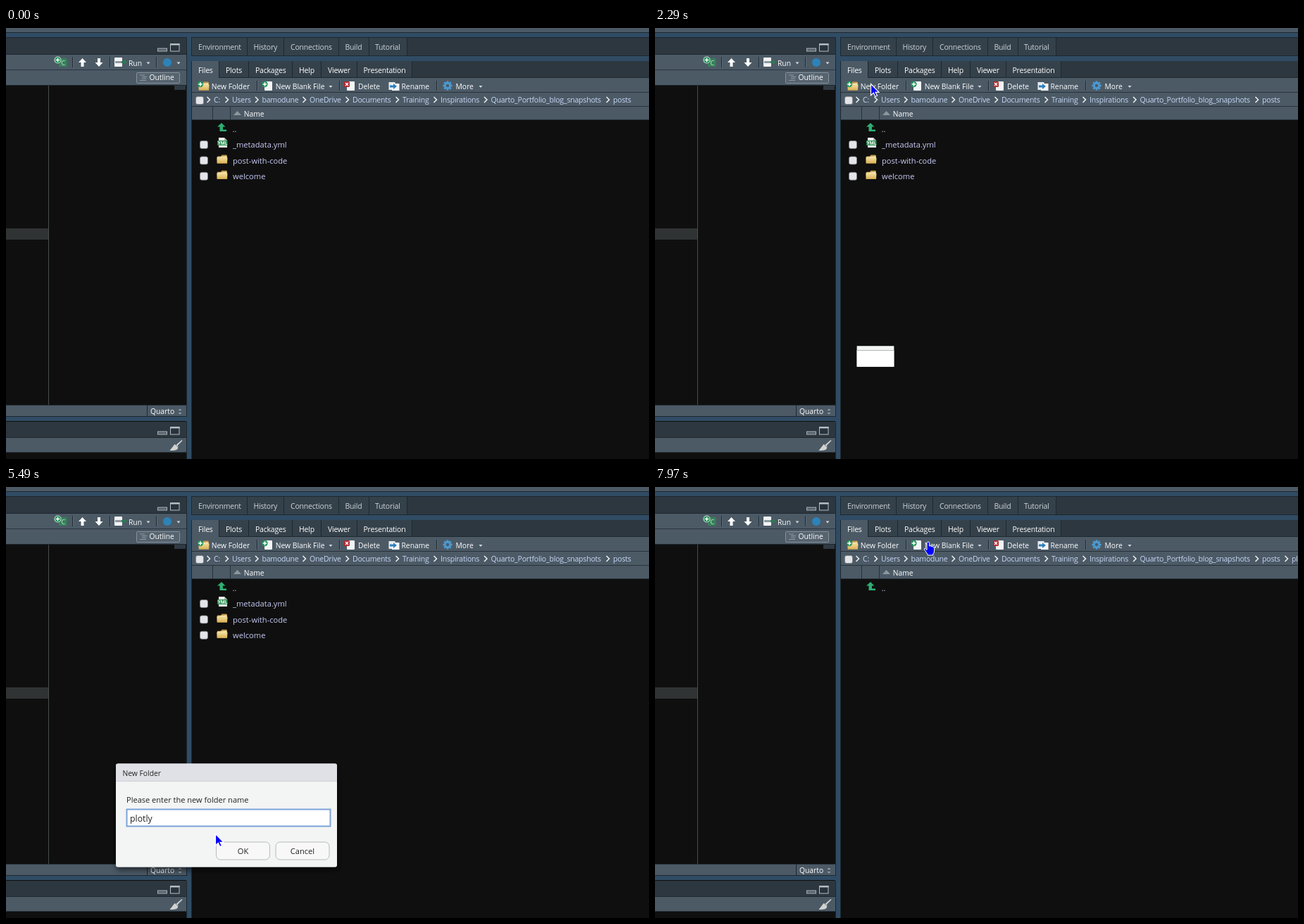
These frames come from a looping animation (913 by 613 pixels, 8000 ms). An HTML page:

```html
<!DOCTYPE html>
<html lang="en">
<head>
<meta charset="utf-8">
<title>New folder</title>
<style>
html, body { margin: 0; width: 100%; height: 100%; overflow: hidden; background: #0f0f0f; }
svg { display: block; width: 100vw; height: 100vh; }
text { font-family: "Open Sans", "Noto Sans", sans-serif; white-space: pre; }
</style>
</head>
<body>
<svg id="stage" viewBox="0 0 913 613" xmlns="http://www.w3.org/2000/svg"></svg>
<script>
const LOOP = 8000;
const BAR = '#4c5a66', TABS = '#2d373f', TAB = '#35414a', EDGE = '#1d2830', DARK = '#0f0f0f';
const WHITE = '#ffffff', PALE = '#ccd3d9', LINK = '#c6caf4', CRUMB = '#c8d7f6';

const rect = (x, y, w, h, fill, more = '') =>
  `<rect x="${x}" y="${y}" width="${w}" height="${h}" fill="${fill}" ${more}/>`;
const path = (d, fill, more = '') => `<path d="${d}" fill="${fill}" ${more}/>`;
const line = (d, stroke, width = 1) => path(d, 'none', `stroke="${stroke}" stroke-width="${width}"`);
const text = (x, y, s, fill = WHITE, size = 10.3, more = '') =>
  `<text x="${x}" y="${y}" fill="${fill}" font-size="${size}" ${more}>${s}</text>`;
const group = (id, body, more = '') => `<g id="${id}" ${more}>${body}</g>`;
const at = (x, y, body) => `<g transform="translate(${x} ${y})">${body}</g>`;

const caret = (x, y) => path(`M${x - 2.5} ${y - 1}h5l-2.5 3z`, '#d5dadd');
const divider = (x, y, h) => rect(x, y, 1, h, '#1f2930') + rect(x + 1, y, 1, h, '#5d6b77');
const checkbox = (x, y) => rect(x, y, 11, 11, '#e3e5e8', 'rx="2.5" stroke="#777d82" stroke-width=".8"');
const chevron = x => line(`M${x - 2} 98l4 4-4 4`, '#eef1f4', 1.5);
const plus = (x, y) => `<circle cx="${x}" cy="${y}" r="4.2" fill="#22935a"/>` +
  line(`M${x - 2.8} ${y}h5.6M${x} ${y - 2.8}v5.6`, '#fff', 1.5);
const page = (x, y) => rect(x, y, 11, 13, '#f2f4f5', 'rx="1"');
const folder = (x, y) => at(x, y,
  path('M0 3V12H14.5V1.2L13.5 0H7L5.5 2H1Z', '#c39b48') +
  path('M1 3L13.8 2V4H1Z', '#fff3cc') + path('M0 4H15L14.5 12H.5Z', 'url(#gold)'));
const windowIcons = y =>
  rect(215.5, y + 6.5, 13, 4, '#56616a', 'stroke="#a9b1b7"') +
  rect(233.5, y, 12.5, 10.5, '#28323a', 'stroke="#b6bdc2"') + rect(233, y - .5, 13.5, 2.5, '#b6bdc2');

function tabRow(y, h, tabs, selected) {
  let s = rect(264, y, 649, h, TABS);
  tabs.forEach(([label, x, left, right], i) => {
    s += rect(left, y, right - left, h, i === selected ? BAR : TAB) +
      rect(right, y, 1, h, EDGE) +
      text(x, y + 16.6, label, y > 40 ? WHITE : PALE, 10.5, 'letter-spacing="-.2"');
  });
  return s;
}

function leftSide() {
  const arrowUp = 'M0-6L5.5 0H2V6H-2V0H-5.5Z';
  return rect(0, 14, 256, 538, DARK) +
    rect(0, 14, 256, 24, TABS) + rect(0, 37, 256, 1, EDGE) + windowIcons(22.5) +
    rect(0, 38, 256, 44, BAR) + rect(0, 59, 256, 1, '#2b363f') + rect(0, 81, 256, 1, EDGE) +
    rect(75, 43, 11.5, 12, '#37815a', 'rx="1"') + text(78.5, 53, 'C', '#cfe6d8', 9) +
    '<circle cx="73.5" cy="45.5" r="5" fill="#e4efe8"/>' + plus(73.5, 45.5) +
    divider(94, 41, 15) + at(108.5, 49, path(arrowUp, WHITE)) +
    at(132, 49, path(arrowUp, WHITE, 'transform="rotate(180)"')) + divider(147, 41, 15) +
    rect(154, 42, 11, 13, '#f2f4f5', 'rx="1"') + rect(155, 47, 9, 3, '#8d989f') +
    path('M164 47h4v-2l4 3.5-4 3.5v-2h-4z', '#2c7a53') +
    text(174, 53.5, 'Run') + caret(202, 49.5) + divider(213, 41, 15) +
    '<circle cx="229" cy="49" r="6" fill="#2d83b8"/>' + caret(245, 49.5) +
    rect(185.5, 63.5, 61, 15, '#566470', 'rx="1" stroke="#87929b"') +
    line('M190 67h7M193 69.5h7M193 72h6M190 74.5h9', '#8f9aa2') + text(203.5, 74.4, 'Outline') +
    rect(239, 82, 16, 6, '#2f3a43') +
    rect(0, 285, 60, 16, '#303333') + rect(60, 82, 1, 454, '#494d4e') +
    rect(0, 536, 256, 16, BAR) + rect(0, 536, 256, 1, '#27323a') + rect(200, 536, 1, 16, EDGE) +
    text(205, 548.8, 'Quarto') + path('M244.5 544l2.5-2.5 2.5 2.5zM244.5 547l2.5 2.5 2.5-2.5z', '#98a3ab') +
    rect(256, 14, 1, 538, EDGE) + rect(0, 552, 257, 1, EDGE) +
    rect(0, 559, 256, 54, DARK) + rect(0, 560, 256, 23, TABS) + rect(0, 582, 256, 1, EDGE) +
    windowIcons(567.5) + rect(0, 583, 256, 21, BAR) + rect(0, 603, 256, 1, '#27323a') +
    path('M249.5 586l-8 7-2-1-7 9c5 0 8 0 11-2l1-4-1-1 7-7z', '#d2d3d0') +
    line('M240 592l4 4', '#838b90') + rect(256, 560, 1, 53, EDGE);
}

function rightSide() {
  const teeth = Array.from({ length: 8 }, (_, i) =>
    `<rect x="-1.4" y="-6.6" width="2.8" height="4" fill="#4b9ad2" transform="rotate(${i * 45})"/>`).join('');
  return rect(263, 13, 650, 27, EDGE) + tabRow(14, 25, [
    ['Environment', 273, 264, 342], ['History', 351.5, 343, 394], ['Connections', 404, 395, 472],
    ['Build', 481.5, 473, 515], ['Tutorial', 524, 516, 569]]) +
    rect(263, 47, 650, 566, EDGE) + tabRow(47, 24, [
    ['Files', 273, 264, 302], ['Plots', 312, 303, 344], ['Packages', 354, 345, 406],
    ['Help', 416, 407, 447], ['Viewer', 457, 448, 498], ['Presentation', 507.5, 499, 576]], 0) +
    rect(303, 70, 610, 1, EDGE) + rect(264, 71, 649, 21, BAR) + rect(264, 91, 649, 1, '#27323a') +
    rect(264, 92, 649, 521, DARK) +
    folder(273.5, 76.5) + plus(276, 80) + text(291.7, 87, 'New Folder') + divider(356, 75, 14) +
    page(367, 76) + plus(367.5, 80) + text(382.7, 87, 'New Blank File') + caret(461, 83) + divider(473, 75, 14) +
    page(484, 76) + rect(480, 76, 8, 8, '#b3282d', 'rx="1.5"') + line('M482 78l4 4m0-4l-4 4', '#fff', 1.4) +
    text(500, 87, 'Delete') +
    rect(543.5, 77, 9, 11, '#e8ebed') + rect(548, 79, 10.5, 10, '#f5f6f7') +
    path('M545 81.5h5v-2.5l5 4-5 4v-2.5h-5z', '#2d80bd') + text(561.5, 87, 'Rename') + divider(611, 75, 14) +
    at(627, 82, teeth + '<circle r="3.6" fill="none" stroke="#4b9ad2" stroke-width="2.6"/>') +
    text(638.5, 87, 'More') + caret(674, 83);
}

function listing() {
  const crumbs = [['C:', 295], ['Users', 321], ['bamodune', 363.5], ['OneDrive', 431], ['Documents', 492],
    ['Training', 563], ['Inspirations', 617], ['Quarto_Portfolio_blog_snapshots', 688.5], ['posts', 862]];
  const crumb = ([name, x]) => chevron(x - 7.5) +
    text(x, 105.6, name, CRUMB, 10.5, 'letter-spacing="-.2"');
  const row = (i, name, id = '') => checkbox(275.5, 160.5 + i * 22.4) +
    (i ? folder(299.5, 158 + i * 22.4) : '') + text(322, 170 + i * 22.5, name, LINK, 11.15, id);
  const yml = path('M302 156h8l4 4v10h-12z', '#eef1ee') + path('M310 156v4h4z', '#a9b8ae') +
    rect(300, 160, 14.5, 7, '#268b4c') + text(300.8, 166.2, 'YML', '#fff', 6.4, 'font-weight="700"');
  return rect(264, 92, 649, 38, BAR) + rect(264, 111, 649, 1, '#27323a') + rect(264, 130, 649, 1, '#27323a') +
    rect(293, 112, 1, 18, '#27323a') + rect(318, 112, 1, 18, '#27323a') +
    checkbox(269.5, 97.5) + crumbs.map(crumb).join('') + group('subCrumb', crumb(['plotly', 904])) +
    path('M323 124h11l-5.5-6z', '#8d979e') + text(337.7, 126, 'Name', WHITE, 10.3) +
    path('M306 135l5.5 5.5H308v4h5V147h-9.5v-6.5h-3.5z', '#2fae72') + text(321.5, 148, '..', LINK, 11.15) +
    group('files', yml + row(0, '_metadata.yml') + row(1, 'post-with-code') + row(2, 'welcome')) +
    group('added', row(3, 'plotly', 'id="addedName"'));
}

function dialog() {
  const button = (x, label) => rect(x + .5, 505, 76, 25, '#f8f8f8', 'rx="6" stroke="#b9babb"') +
    text(x + 38.5, 522, label, '#222', 11.1, 'text-anchor="middle"');
  return group('dialog',
    `<g filter="url(#shadow)">${rect(156, 393.5, 314, 147, '#f3f4f4', 'rx="3"')}</g>` +
    path('M156 418V396.5q0-3 3-3H467q3 0 3 3V418z', '#e0e1e6') + rect(156, 418, 314, 1, '#d0d1d5') +
    text(165.5, 410.5, 'New Folder', '#222', 10.3) +
    text(171, 448.5, 'Please enter the new folder name', '#222', 11.06) +
    rect(171.5, 458.5, 289, 24, '#fff', 'id="field"') +
    text(176, 475.6, '', '#222', 12.3, 'id="typed"') + rect(176, 462, 1, 17, '#111', 'id="beam"') +
    button(298, 'OK') + button(382.5, 'Cancel'), 'clip-path="url(#reveal)"');
}

const stage = document.getElementById('stage');
stage.innerHTML = `<defs>
  <linearGradient id="gold" x2="0" y2="1"><stop stop-color="#f3df9c"/><stop offset="1" stop-color="#d9b055"/></linearGradient>
  <filter id="shadow" x="-10%" y="-10%" width="120%" height="130%"><feDropShadow dx="1" dy="4" stdDeviation="4" flood-opacity=".6"/></filter>
  <clipPath id="reveal"><rect id="opening"/></clipPath></defs>` +
  rect(0, 0, 913, 613, '#304c64') + rect(0, 0, 913, 6, BAR) + rect(0, 6, 913, 1, EDGE) + rect(0, 13, 257, 1, EDGE) +
  leftSide() + rightSide() + group('listing', listing()) +
  group('tip', rect(315.5, 93.5, 117, 23, '#f9f9f9', 'rx="3" stroke="#bdbdbd"') +
    text(323, 109, 'Create a new folder', '#575757', 10.8)) +
  dialog() +
  group('pointer',
    path('M.5 .5V16.8L4.3 13.3L6.8 18.5L9.5 17.3L7 12.3H12Z', '#00f', 'id="arrow" stroke="#fff" stroke-width="1.2"') +
    path('M-2 1.6Q-2 0-.2 0Q1.6 0 1.6 1.6V6Q3.6 5 4.6 6.6Q6.4 6 7 7.6Q8.6 7.4 8.6 9V13Q8.4 16 6.8 17V19H-1V17.5L-5.6 11Q-6 9-4.2 9.4L-2 11.5Z',
      '#00f', 'id="hand" stroke="#fff"'));

const $ = id => document.getElementById(id);
const show = (id, on) => $(id).setAttribute('display', on ? 'inline' : 'none');
const set = (id, attrs) => { for (const k in attrs) $(id).setAttribute(k, attrs[k]); };

// start, end, steps, then the start, control and end point of a curve
const moves = [
  [140, 890, 12, [692, 492], [460, 190], [315, 55]],
  [960, 1230, 5, [308, 53], [292, 68], [306, 79]],
  [2760, 3160, 7, [311, 100], [385, 300], [297, 493]],
  [6760, 7290, 9, [303, 440], [315, 320], [329, 236]],
  [7630, 7970, 6, [334, 218], [362, 120], [388, 78]]
];
const keys = [4360, 4430, 4630, 4760, 4830, 4960];

function pointerAt(t) {
  const move = moves.filter(m => t >= m[0]).pop();
  if (!move) return null;
  const [start, end, steps, a, b, c] = move;
  const i = Math.min(steps - 1, Math.floor((t - start) * (steps - 1) / (end - start) + 1e-6));
  const v = i / (steps - 1), u = v * v * (3 - 2 * v) * .5 + v * .5;
  return [0, 1].map(k => (1 - u) ** 2 * a[k] + 2 * u * (1 - u) * b[k] + u * u * c[k]);
}

function draw(t) {
  const loading = t >= 7500 && t < 7700, inside = t >= 7700;
  const open = t >= 2290 && t < 5760, focused = t >= 2560;
  show('listing', !loading);
  show('files', !inside);
  show('added', t >= 6090 && !inside);
  show('subCrumb', inside);
  show('tip', t >= 1760 && t < 2290);

  show('dialog', open);
  const p = Math.min(1, (Math.floor((t - 2290) / 66) + 1) / 4);
  const grow = Math.max(0, (1 - Math.cos(Math.PI * p)) / 2);
  set('opening', { x: 313 - 180 * grow, y: 467 - 100 * grow, width: 360 * grow, height: 200 * grow });
  set('field', focused ? { stroke: '#7da3d9', 'stroke-width': 2 } : { stroke: '#b4b5b8', 'stroke-width': 1 });
  const count = keys.filter(k => t >= k).length;
  const typed = 'plotly'.slice(0, count);
  if ($('typed').textContent !== typed) $('typed').textContent = typed;
  const blinkStart = count ? keys[count - 1] : 2560;
  show('beam', focused && Math.floor((t - blinkStart) / 530) % 2 === 0);
  set('beam', { x: 176 + (open && count ? $('typed').getComputedTextLength() : 0) });

  const pos = pointerAt(t);
  show('pointer', pos);
  if (!pos) return;
  const [x, y] = pos;
  const onName = t >= 6760 && t < 7570 && x >= 322 && x < 351 && y >= 227 && y < 242;
  const onTool = y >= 73 && y < 92 && x > 268 && x < 455 && !(t >= 2290 && t < 5760);
  set('pointer', { transform: `translate(${x.toFixed(1)} ${y.toFixed(1)})` });
  show('hand', onName || onTool);
  show('arrow', !(onName || onTool));
  set('addedName', { 'text-decoration': onName ? 'underline' : 'none' });
}

const begin = performance.now();
function tick() {
  draw((performance.now() - begin) % LOOP);
  requestAnimationFrame(tick);
}
draw(0);
requestAnimationFrame(tick);
</script>
</body>
</html>
```
